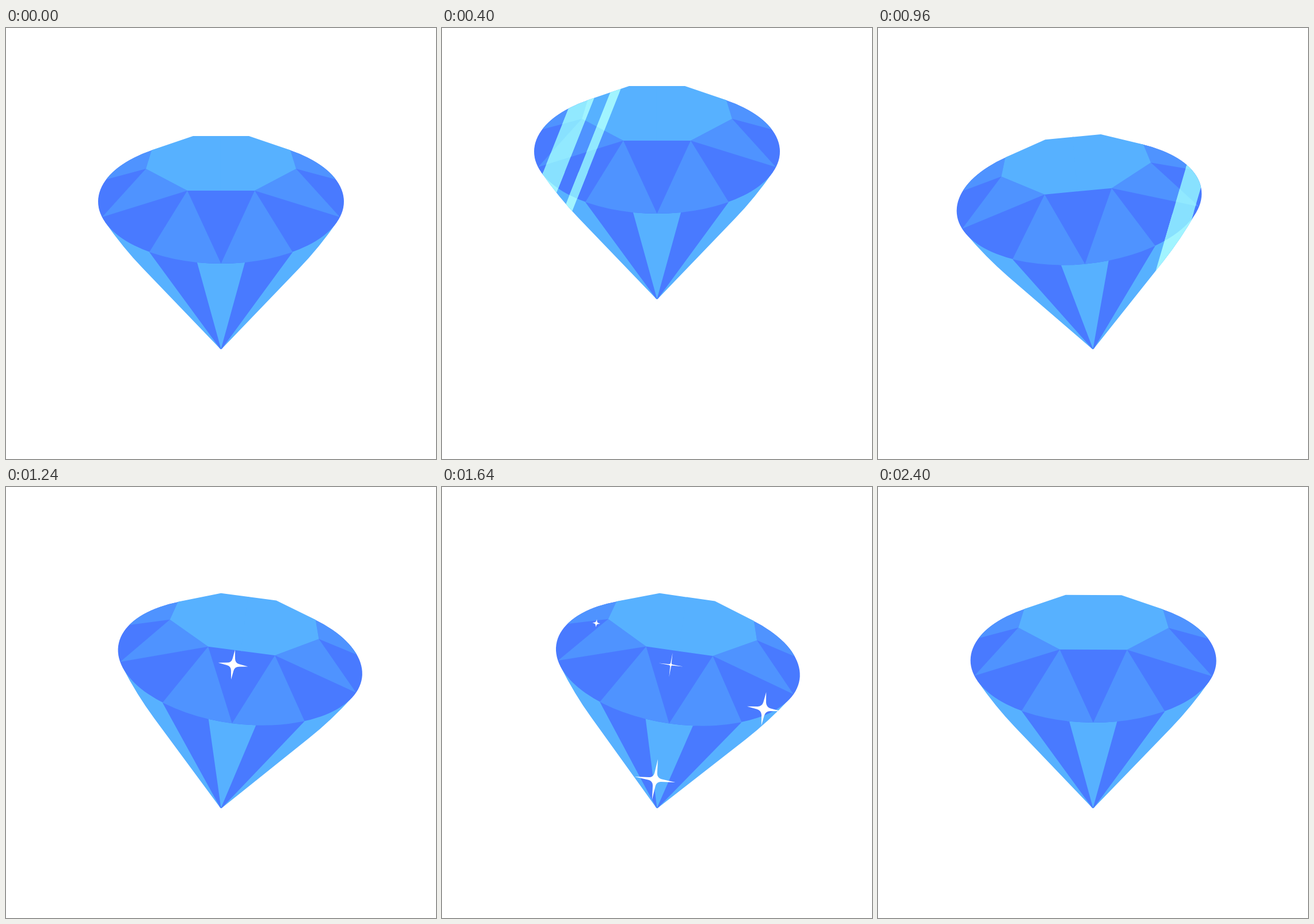
Write an HTML page with a canvas that moves like this. It is 747 by 750 pixels and loops after 2.44 s.

```html
<!DOCTYPE html>
<html lang="en">
<head>
<meta charset="utf-8">
<title>Diamond</title>
<style>
  html, body { margin: 0; width: 100%; height: 100%; overflow: hidden; background: #fff; }
  canvas { display: block; }
</style>
</head>
<body>
<canvas id="stage" width="747" height="750"></canvas>
<script>
const ctx = document.getElementById('stage').getContext('2d');
const LOOP = 2440, STEP = 40;
const TIP = { x: 373.5, y: 558.5 };
const BASE = { light: '#57b1ff', mid: '#4f93ff', dark: '#497aff' };
const SHINE = { light: '#a1f4ff', mid: '#91e9ff', dark: '#88e1ff' };

// Tilt around the tip: [time, degrees]
const TILT = [[800, 0], [1000, -6], [1200, 9], [1400, -6], [1600, 9],
  [1840, -2.5], [2060, 0.6], [2260, -0.25], [2400, 0.15], [2440, 0]];

const STARS = [
  { x: 362, y: 308.5, size: 37, born: 1060 },
  { x: 363, y: 510, size: 38.5, born: 1365 },
  { x: 532.7, y: 361.4, size: 39, born: 1445 },
  { x: 223.6, y: 255.2, size: 23, born: 1570 }
];
const STAR_LIFE = 720;

const clamp = v => Math.min(1, Math.max(0, v));
const smooth = v => v * v * (3 - 2 * v);

// Cubic bezier easing with flat ends; x1 and x2 are the handle positions.
function ease(x, x1, x2) {
  let lo = 0, hi = 1;
  for (let i = 0; i < 24; i++) {
    const s = (lo + hi) / 2, r = 1 - s;
    if (3 * x1 * s * r * r + 3 * x2 * s * s * r + s * s * s < x) lo = s; else hi = s;
  }
  return smooth(lo);
}

function lift(t) {
  if (t >= 800) return 0;
  return 87 * (t < 400 ? ease(t / 400, 0.33, 0.34) : 1 - ease((t - 400) / 400, 0.65, 0.67));
}

function tilt(t) {
  for (let i = 1; i < TILT.length; i++) {
    const [t0, a] = TILT[i - 1], [t1, b] = TILT[i];
    if (t <= t1) return a + (b - a) * smooth(clamp((t - t0) / (t1 - t0)));
  }
  return 0;
}

function poly(color, points) {
  ctx.beginPath();
  points.forEach(([x, y]) => ctx.lineTo(x, y));
  ctx.closePath();
  ctx.fillStyle = color;
  ctx.fill();
}

function mirrored(color, points) {
  poly(color, points);
  poly(color, points.map(([x, y]) => [2 * TIP.x - x, y]));
}

function drawGem(colors) {
  // Lower part: curved shoulders, straight flanks, blunt tip
  ctx.beginPath();
  ctx.moveTo(172, 337.5);
  ctx.quadraticCurveTo(202.8, 382, 238, 418.6);
  ctx.lineTo(371.8, 558);
  ctx.quadraticCurveTo(TIP.x, 560, 375.2, 558);
  ctx.lineTo(509, 418.6);
  ctx.quadraticCurveTo(544.2, 382, 575, 337.5);
  ctx.closePath();
  ctx.fillStyle = colors.light;
  ctx.fill();
  mirrored(colors.dark, [[249, 390], [332, 408], [TIP.x, TIP.y], [372.3, TIP.y]]);

  // Crown
  ctx.save();
  ctx.beginPath();
  ctx.ellipse(TIP.x, 302, 213.5, 108, 0, 0, 2 * Math.PI);
  ctx.fillStyle = colors.dark;
  ctx.fill();
  ctx.clip();
  mirrored(colors.mid, [[243, 245], [253, 213], [264, 178], [100, 178], [100, 283.4]]);
  mirrored(colors.mid, [[243, 245], [315, 283], [167, 329]]);
  mirrored(colors.mid, [[315, 283], [183, 497], [432, 537]]);
  ctx.restore();

  mirrored(colors.light, [[TIP.x + 1, 188], [325, 188], [253, 212.5], [243, 245],
    [315, 283], [TIP.x + 1, 283]]);
}

function drawShine(t) {
  const slope = 0.397, left = 170 + 571 * smooth(clamp(t / 1240));
  ctx.save();
  ctx.beginPath();
  for (const [from, to] of [[0, 37.3], [61.5, 77.3]]) {
    const a = left + from, b = left + to;
    ctx.moveTo(a, 0);
    ctx.lineTo(b, 0);
    ctx.lineTo(b - slope * 750, 750);
    ctx.lineTo(a - slope * 750, 750);
    ctx.closePath();
  }
  ctx.clip();
  drawGem(SHINE);
  ctx.restore();
}

// Four tapered arms around a rounded core that thins out with age
function drawStar({ x, y, size, born }, t) {
  const age = (t - born) / STAR_LIFE;
  if (age <= 0 || age >= 1) return;
  const r = size * Math.sin(Math.PI * age);
  const core = r * (0.04 + 0.2 * (1 - age) ** 3);
  ctx.save();
  ctx.translate(x, y);
  ctx.beginPath();
  ctx.moveTo(r, 0);
  for (let i = 0; i < 4; i++) {
    ctx.arcTo(core, core, 0, r, core * 3);
    ctx.lineTo(0, r);
    ctx.rotate(Math.PI / 2);
  }
  ctx.fillStyle = '#fff';
  ctx.fill();
  ctx.restore();
}

function draw(now) {
  const t = Math.floor((now % LOOP) / STEP) * STEP;
  ctx.fillStyle = '#fff';
  ctx.fillRect(0, 0, 747, 750);
  ctx.save();
  ctx.translate(TIP.x, TIP.y - lift(t));
  ctx.rotate(tilt(t) * Math.PI / 180);
  ctx.translate(-TIP.x, -TIP.y);
  drawGem(BASE);
  if (t < 1240) drawShine(t);
  STARS.forEach(star => drawStar(star, t));
  ctx.restore();
}

let start;
function tick(now) {
  start ??= now;
  draw(now - start);
  requestAnimationFrame(tick);
}
draw(0);
requestAnimationFrame(tick);
</script>
</body>
</html>
```
